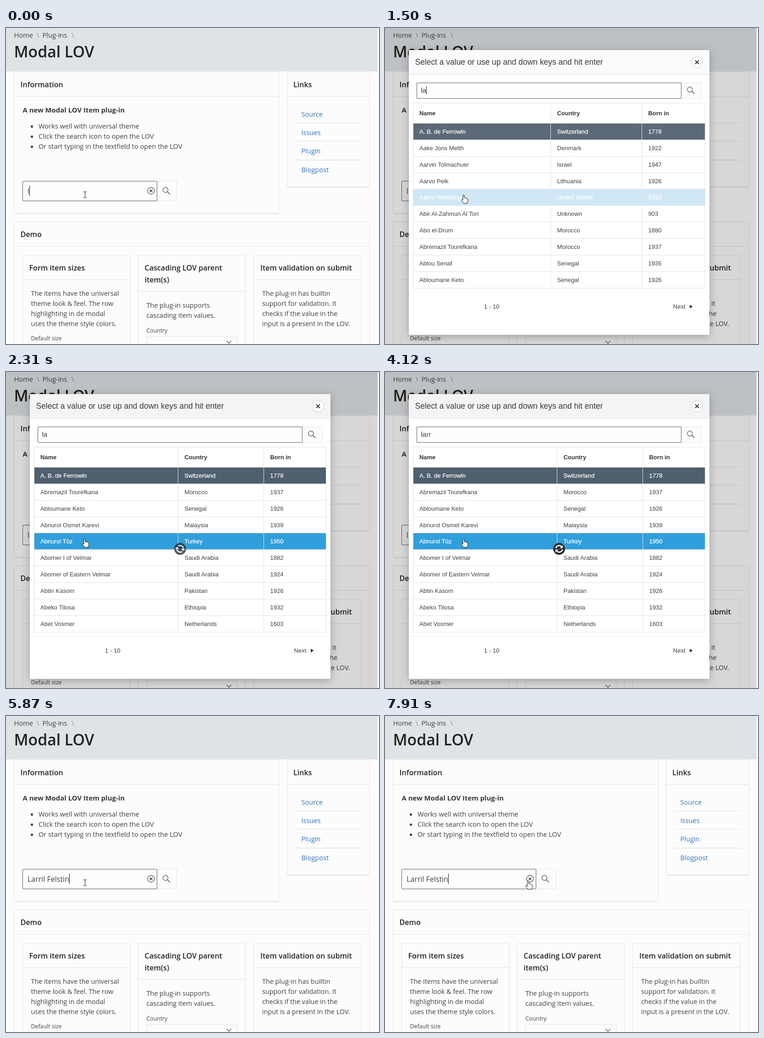
Recreate the animation shown at these times as an HTML page. Size 814 px wide and 688 px high, loop 8 s.

```html
<!DOCTYPE html>
<html lang="en">
<head>
<meta charset="utf-8">
<title>Modal LOV</title>
<style>
  html, body { margin: 0; width: 100%; height: 100%; overflow: hidden; background: #fff; }
  svg { display: block; }
  text { font: 14.6px "Open Sans", "Noto Sans", sans-serif; fill: #404040; white-space: pre; }
  .title { font-size: 33.7px; font-weight: 600; fill: #222; }
  .head { font-size: 16.1px; font-weight: 600; fill: #222; }
  .strong { font-size: 14.9px; font-weight: 700; fill: #383838; }
  .body { font-size: 14.4px; }
  .label { font-size: 12.35px; }
  .value { font-size: 16px; }
  .link { fill: #3576b8; }
  .slash { fill: #888; }
  .box { fill: #fcfcfc; stroke: #e4e4e4; }
  .field { fill: #fdfdfd; stroke: #4d5e6e; }
  .line { fill: none; stroke: #e2e2e2; }
  .icon { fill: none; stroke: #404040; stroke-width: 1.1; }
  .caret { stroke: #111; }
  #modal text { font: 13.1px "Liberation Sans", Arial, sans-serif; }
  #modal .caption { font-size: 17.45px; fill: #3a3a3a; }
  #modal .query { font-size: 15px; }
  #modal .th { font-size: 12.95px; font-weight: 700; fill: #333; }
  #modal .lit { fill: #fff; stroke: #fff; stroke-width: .25px; }
  #window { filter: drop-shadow(0 4px 9px rgba(0, 0, 0, .25)); }
  .pointer { fill: #fff; stroke: #111; stroke-linejoin: round; }
</style>
</head>
<body>
<svg width="814" height="688" viewBox="0 0 814 688">
  <defs>
    <g id="lens" class="icon">
      <circle r="5.6"/>
      <path d="M4 4L10 9.6" stroke-width="1.3"/>
    </g>
    <g id="wheel">
      <path id="sweep" d="M-7.2-1.2A7.2 7.2 0 0 1 4.8-5.2" fill="none" stroke="#fff" stroke-width="2.5"/>
      <path id="tip" d="M7.9-8V-1.6H1.5Z" fill="#fff"/>
      <use href="#sweep" transform="rotate(180)"/>
      <use href="#tip" transform="rotate(180)"/>
    </g>
  </defs>

  <g id="page">
    <rect width="811" height="688" fill="#fcfcfc"/>
    <rect width="811" height="94.5" fill="#dfe3e6"/>
    <text x="17.5" y="21">Home</text><text class="slash" x="67" y="21">\</text>
    <text x="79.5" y="21">Plug-ins</text><text class="slash" x="143" y="21">\</text>
    <text class="title" x="17.5" y="63.5">Modal LOV</text>

    <rect class="box" x="17.5" y="95.5" width="578" height="308" rx="2"/>
    <path class="line" d="M18 149.5H595"/>
    <path d="M19 404H594" stroke="#d8d8d8"/>
    <text class="head" x="31.5" y="129">Information</text>
    <text class="strong" x="36.5" y="184">A new Modal LOV Item plug-in</text>
    <g fill="#404040">
      <circle cx="56.5" cy="214.5" r="2.6"/><circle cx="56.5" cy="236.5" r="2.6"/><circle cx="56.5" cy="258.5" r="2.6"/>
    </g>
    <text x="71" y="219">Works well with universal theme</text>
    <text x="71" y="241">Click the search icon to open the LOV</text>
    <text x="71" y="263">Or start typing in the textfield to open the LOV</text>

    <rect class="box" x="329.5" y="333.5" width="43" height="43" rx="1.5"/>
    <rect class="field" x="36.5" y="333.5" width="293" height="43" rx="1.5"/>
    <text class="value" id="value" x="47" y="361"></text>
    <path class="caret" id="caret" d="M0 343V366"/>
    <circle class="icon" cx="316.5" cy="354.5" r="7.4"/>
    <path d="M313.7 351.7l5.600 5.600m0-5.600l-5.600 5.600" stroke="#333" stroke-width="1.5"/>
    <use href="#lens" x="348" y="352.5"/>

    <rect class="box" x="613.5" y="95.5" width="180" height="250.5" rx="2"/>
    <path class="line" d="M613 149.5H794M632 206.5H776M632 246.5H776"/>
    <path d="M632 287.5H776M614 346.5H793" stroke="#d6d6d6"/>
    <text class="head" x="627" y="129">Links</text>
    <text class="link" x="644.5" y="193">Source</text>
    <text class="link" x="644.5" y="233">Issues</text>
    <text class="link" x="644.5" y="273">Plugin</text>
    <text class="link" x="644.5" y="314">Blogpost</text>

    <rect class="box" x="17.5" y="421.5" width="776" height="300" rx="2"/>
    <path class="line" d="M18 475.5H793"/>
    <text class="head" x="31.5" y="455">Demo</text>
    <rect class="box" x="36.5" y="494.5" width="234" height="220" rx="2"/>
    <rect class="box" x="288.5" y="494.5" width="234" height="220" rx="2"/>
    <rect class="box" x="540.5" y="494.5" width="235" height="220" rx="2"/>
    <path class="line" d="M37 547.5H270M289 573.5H522M541 547.5H775"/>
    <text class="head" x="50.5" y="528">Form item sizes</text>
    <text class="head" x="302.5" y="528">Cascading LOV parent</text>
    <text class="head" x="302.5" y="554">item(s)</text>
    <text class="head" x="555" y="528">Item validation on submit</text>
    <g id="copy"></g>
    <text class="label" x="54.5" y="680">Default size</text>
    <text class="label" x="306.5" y="662.5">Country</text>
    <rect class="box" x="306.5" y="671.5" width="198" height="40" rx="2"/>
    <path class="icon" d="M481.5 681.5l5 5 5-5"/>
  </g>

  <g id="pageSpin"><circle r="13" fill="#2b3035"/><use href="#wheel"/></g>

  <g id="modal">
    <rect width="811" height="688" opacity=".15"/>
    <rect id="window" x="52" y="48" width="656" height="620" rx="2" fill="#fff"/>
    <rect id="bar" x="52" y="48" width="656" height="52" rx="2"/>
    <path class="line" d="M52 100.5H708"/>
    <text class="caption" x="65.5" y="80">Select a value or use up and down keys and hit enter</text>
    <circle cx="681" cy="74.5" r="12.5" fill="#fff" stroke="#c9c9c9"/>
    <path d="M677 70.5l8 8m0-8l-8 8" stroke="#333" stroke-width="1.9"/>
    <rect class="box" x="646.5" y="119.5" width="43" height="34" rx="1.5"/>
    <rect class="field" x="69.5" y="119.5" width="577" height="34" rx="1.5"/>
    <use href="#lens" x="665.5" y="134"/>
    <text class="query" id="query" x="78.5" y="140.5"></text>
    <path class="caret" id="queryCaret" d="M0 127V144"/>
    <g id="table"></g>
    <g id="modalSpin"><circle r="13" fill="#2b3035"/><use href="#wheel"/></g>
  </g>

  <g id="pointer">
    <path id="beam" d="M-3.5-6.5h2.500l1 1 1-1h2.500M0-6V6M-3.5 6.500h2.500l1-1 1 1h2.500" fill="none" stroke="#111"/>
    <path id="hand" class="pointer" d="M-1.5 1q1.5-2 3 0v6q1.5-1.2 3 .4q1.6-.8 2.8.8q2-.3 2 1.5v4q0 2-1.5 5h-8q-1-2.5-5-7q.5-2.3 3-.5l.7.8z"/>
    <path id="arrow" class="pointer" d="M0 0v14.5l3.4-3.2 2.4 5.2 2.2-1-2.4-5h4.7z"/>
  </g>
</svg>
<script>
const LOOP = 8000;
const $ = id => document.getElementById(id);
const OFF = null;

// Card paragraphs: x, first baseline, lines
const copy = [
  [54.5, 583, "The items have the universal", "theme look & feel. The row", "highlighting in de modal", "uses the theme style colors."],
  [306.5, 609, "The plug-in supports", "cascading item values."],
  [559, 583, "The plug-in has builtin", "support for validation. It", "checks if the value in the", "input is a present in the LOV."]
];
const escape = s => s.replace(/&/g, "&amp;");
const label = (x, y, s, cls) => `<text class="${cls}" x="${x}" y="${y}">${escape(s)}</text>`;
$("copy").innerHTML = copy.map(([x, y, ...lines]) =>
  lines.map((s, i) => label(x, y + 22 * i, s, "body")).join("")).join("");

const lists = {
  all: { cols: [361.5, 560.5], rows: [
    "A. B. de Ferrowin|Switzerland|1778", "Aake Jons Melth|Denmark|1922",
    "Aarvin Tolmachuer|Israel|1947", "Aarvo Pelk|Lithuania|1926",
    "Aarvo Wendling|United States|1923", "Abir Al-Zahmun Al Tori|Unknown|903",
    "Abo el-Drum|Morocco|1880", "Abremazil Tourefkana|Morocco|1937",
    "Ablou Senaf|Senegal|1935", "Abloumane Keto|Senegal|1926"] },
  some: { cols: [375.5, 562.5], rows: [
    "A. B. de Ferrowin|Switzerland|1778", "Abremazil Tourefkana|Morocco|1937",
    "Abloumane Keto|Senegal|1926", "Abnurol Osmet Karevi|Malaysia|1939",
    "Abnurol Tüz|Turkey|1950", "Abomer I of Velmar|Saudi Arabia|1882",
    "Abomer of Eastern Velmar|Saudi Arabia|1924", "Abtin Kasom|Pakistan|1926",
    "Abeko Tilosa|Ethiopia|1932", "Abet Vosmer|Netherlands|1603"] },
  few: { cols: [304.5, 537.5], rows: [
    "Larril Felstin|United States|1944", "Larrin Mobek|United States|1942",
    "Larris Undolm|United States|1931"] }
};
const edge = i => Math.round(207 + 35.85 * i) + .5;

function tableMarkup({ cols, rows }, picked, hovered, rule) {
  const xs = [75, cols[0] + 14, cols[1] + 14];
  const end = edge(rows.length);
  const fills = { 0: picked, 4: rows.length > 4 && hovered };
  let out = ["Name", "Country", "Born in"].map((s, i) => label(xs[i], 189.5, s, "th")).join("");
  let grid = `M61.5 163.5H698.5V${end}H61.5Z`;
  rows.forEach((row, i) => {
    const y = edge(i), fill = fills[i];
    if (fill) out += `<rect x="62" y="${y}" width="636" height="${edge(i + 1) - y}" fill="${fill}"/>`;
    row.split("|").forEach((s, c) => out += label(xs[c], y + 22.5, s, fill ? "lit" : ""));
    grid += `M62 ${y}H698`;
  });
  cols.forEach(x => grid += `M${x} 163V${end}`);
  out += `<path class="line" d="${grid}"/>`;
  if (rule) out += `<path d="M53 ${end + 9}H707" stroke="#f0f0f0"/>`;
  if (rows.length < 10) return out + label(366.5, 347, "1 - 3", "");
  return out + label(216, 611, "1 - 10", "") + label(628.5, 611, "Next", "") +
    `<path d="M665 602.5l6.5 4-6.5 4z" fill="#333"/>`;
}

// Stepped tracks: [ms, value], each value holds until the next
const tracks = {
  value: [[0, "l"], [460, "la"], [5870, "Larril Felstin"]],
  caret: [[0, 51.5], [460, 59.5], [970, OFF], [5870, 138.5], [6390, OFF], [6950, 138.5], [7360, OFF], [7910, 138.5]],
  modal: [[0, false], [1500, true], [5870, false]],
  query: [[0, "la"], [2870, "lar"], [3300, "larr"]],
  queryCaret: [[0, 90.5], [1920, OFF], [2450, 90.5], [2870, 95.5], [3300, 100.5], [3700, OFF], [4240, 100.5], [4810, OFF], [5340, 100.5]],
  list: [[0, "all"], [2180, "some"], [4240, "few"]],
  bar: [[0, "#fbfbfb"], [1650, "#f7f7f7"], [1770, "#f4f4f4"]],
  picked: [[0, "#5c6976"], [1650, "#556472"], [1770, "#4f5f6d"]],
  hovered: [[0, "#d0e7f5"], [1650, "#74bfe6"], [1770, "#309fdb"]],
  rule: [[0, false], [1650, true]],
  pageSpin: [[0, 0], [460, .5], [580, 1], [1500, 0]],
  modalSpin: [[0, 0], [1920, .4], [2040, 1], [2310, .8], [2450, 0], [3570, .5], [3700, 1], [4810, .6], [4930, 0]],
  pointer: [
    [0, ["beam", 172.5, 363]], [1500, ["hand", 171.5, 363]], [4240, ["arrow", 170.5, 362.5]],
    [5870, ["beam", 172.5, 363]], [6950, ["beam", 204, 363]], [7090, ["beam", 246, 364]],
    [7220, ["beam", 291, 365]], [7360, ["hand", 324.5, 360]], [7510, ["hand", 340, 346]],
    [7630, ["hand", 348, 336]], [7780, ["hand", 323, 350]], [7910, ["hand", 312, 358.5]]
  ]
};
const at = (name, t) => tracks[name].filter(([ms]) => ms <= t).pop()[1];
const show = (id, on) => $(id).style.display = on ? "" : "none";

function placeCaret(id, t) {
  const x = at(id, t);
  show(id, x !== OFF);
  if (x !== OFF) $(id).setAttribute("transform", `translate(${x})`);
}
function placeSpinner(id, x, y, t) {
  const angle = Math.floor((t - 4120) / 125) * 45;
  $(id).setAttribute("opacity", at(id, t));
  $(id).setAttribute("transform", `translate(${x} ${y}) rotate(${angle})`);
}

let tableKey = "";
function render(t) {
  $("value").textContent = at("value", t);
  $("query").textContent = at("query", t);
  placeCaret("caret", t);
  placeCaret("queryCaret", t);
  placeSpinner("pageSpin", 391, 346, t);
  placeSpinner("modalSpin", 380, 385, t);
  show("modal", at("modal", t));
  $("bar").setAttribute("fill", at("bar", t));

  const look = ["list", "picked", "hovered", "rule"].map(name => at(name, t));
  if (look.join() !== tableKey) {
    tableKey = look.join();
    $("table").innerHTML = tableMarkup(lists[look[0]], ...look.slice(1));
  }

  const [shape, x, y] = at("pointer", t);
  ["beam", "hand", "arrow"].forEach(id => show(id, id === shape));
  $("pointer").setAttribute("transform", `translate(${x} ${y})`);
}

const start = performance.now();
function tick() {
  render((performance.now() - start) % LOOP);
  requestAnimationFrame(tick);
}
tick();
</script>
</body>
</html>
```
